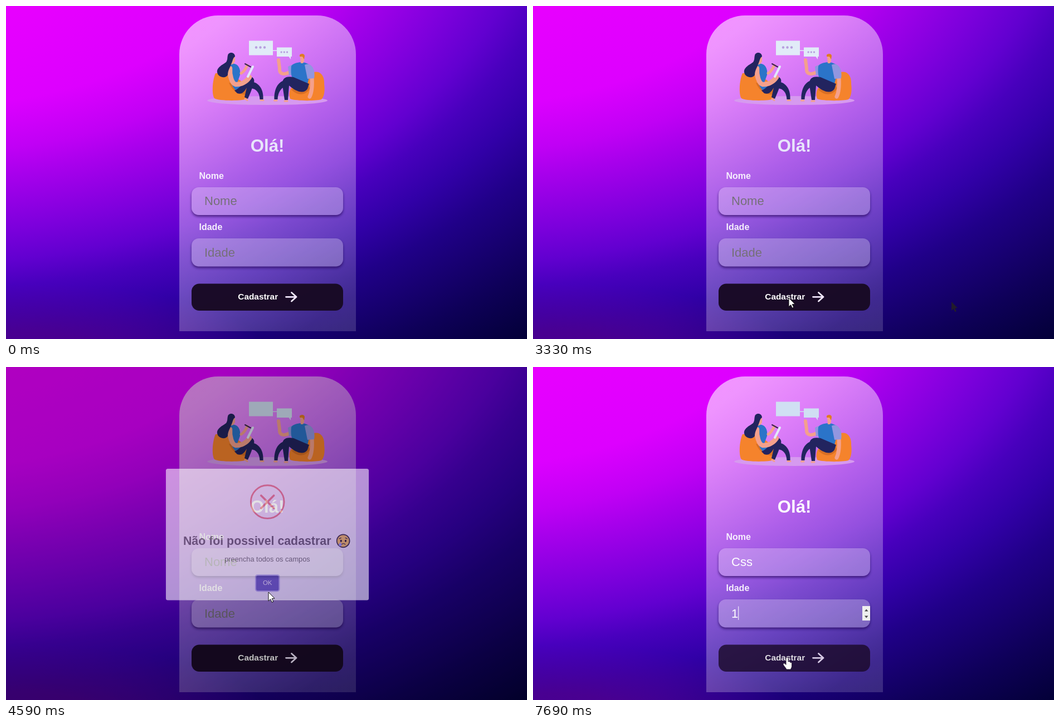
These frames come from a looping animation (935x599 px, 8 s). An HTML page:

```html
<!DOCTYPE html>
<html lang="pt-BR">
<head>
<meta charset="utf-8">
<title>Cadastro</title>
<style>
  html, body { margin: 0; width: 100%; height: 100%; overflow: hidden; background: #4300b8; }
  svg { display: block; width: 935px; height: 599px; font-family: Arial, "Liberation Sans", sans-serif; }
  text { white-space: pre; }
  .bold { font-weight: bold; }
  .field { font-size: 22px; }
  .line { fill: none; stroke-linecap: round; stroke-linejoin: round; }
</style>
</head>
<body>
<svg viewBox="0 0 935 599">
  <defs>
    <radialGradient id="sky" gradientUnits="userSpaceOnUse" gradientTransform="scale(935 599)" cx="-.15" cy="-.4" r="1.81">
      <stop offset=".236" stop-color="#e800ff"/>
      <stop offset=".387" stop-color="#dd00ff"/>
      <stop offset=".464" stop-color="#c000f5"/>
      <stop offset=".508" stop-color="#a800ec"/>
      <stop offset=".596" stop-color="#7c00dc"/>
      <stop offset=".647" stop-color="#6200d0"/>
      <stop offset=".69" stop-color="#4800bd"/>
      <stop offset=".746" stop-color="#3200a8"/>
      <stop offset=".807" stop-color="#200088"/>
      <stop offset=".917" stop-color="#0e0058"/>
      <stop offset="1" stop-color="#030038"/>
    </radialGradient>
    <radialGradient id="corner">
      <stop offset=".3" stop-color="#4c0090" stop-opacity=".9"/>
      <stop offset="1" stop-color="#5a00a8" stop-opacity="0"/>
    </radialGradient>
    <linearGradient id="glass" x1=".3" y1="0" x2=".7" y2="1">
      <stop offset="0" stop-color="#fff" stop-opacity=".58"/>
      <stop offset=".45" stop-color="#fff" stop-opacity=".37"/>
      <stop offset="1" stop-color="#fff" stop-opacity=".16"/>
    </linearGradient>
    <filter id="soft" x="-10%" y="-30%" width="120%" height="160%">
      <feGaussianBlur stdDeviation="2"/>
    </filter>
    <mask id="outside">
      <path fill="#fff" d="M311 310h317v180h-317z"/>
      <rect x="333" y="326" width="272" height="50" rx="13"/>
      <rect x="333" y="418" width="272" height="50.5" rx="13"/>
    </mask>
    <path id="arrow" d="M0 0V16L3.7 12.6 6.2 18.2 8.8 17.1 6.3 11.6 11 11.2Z"/>
  </defs>

  <rect width="935" height="599" fill="url(#sky)"/>
  <ellipse cx="40" cy="625" rx="430" ry="125" fill="url(#corner)"/>
  <path d="M311 585V87A70 70 0 0 1 381 17H558A70 70 0 0 1 628 87V585Z" fill="url(#glass)"/>

  <g id="people">
    <ellipse cx="469" cy="170" rx="108" ry="8" fill="#d69aef"/>
    <path id="bubbles" d="M436 62.500H479V79.500H486V74.500H513V91H511V96L507.500 91H486V81H479V88.500H436Z"/>
    <g id="dots" fill="#b79fdf"></g>

    <path fill="#f5832c" d="M376 121C370 134 369 160 374 166 381 171 425 171 432 167 437 160 434 150 428 140L400 118Z"/>
    <path fill="#d96f24" d="M400 138C406 152 414 158 431 160L434 150 410 140Z"/>
    <path fill="#2b74c9" d="M403 104C414 101 422 110 420 124L415 138 428 147 420 157C411 154 403 140 401 128Z"/>
    <g fill="#22245f">
      <path d="M438 137C452 135 463 149 461.500 168H455.500C455 157 450 148 438 148Z"/>
      <path d="M410 152C420 149 428 134 434 129 441 125 447 130 445 138 442 148 438 158 434 167L428 164C430 156 431 151 432 147 428 154 423 160 415 157Z"/>
    </g>
    <g class="line" stroke="#f4a08c">
      <path d="M402 112C401 124 405 139 412 141 422 142 432 136 437 128" stroke-width="8.500"/>
      <path d="M422 121C428 118 430 112 433 107" stroke-width="5"/>
      <path d="M429 167 433 169.500M457 169.500H462" stroke-width="3"/>
    </g>
    <path fill="#f4a08c" d="M404 92H411V100L408 104 403 106Z"/>
    <path fill="#22245f" d="M398 89C399 82 411 82 411 91 407 93 407 99 404 105 402 111 398 116 398 124 395 131 380 129 379 119 378 110 390 105 395 101 398 97 397 92 398 89Z"/>
    <path class="line" d="M434 127 443 109" stroke="#e1e8f8" stroke-width="4"/>
    <path class="line" d="M429 104 439 109.500" stroke="#3a2350" stroke-width="2"/>

    <path fill="#f5832c" d="M550 120C562 115 572 124 571 140 573 155 570 165 566 168 556 171 520 171 510 167 506 156 510 146 520 140Z"/>
    <path fill="#d96f24" d="M512 150C522 162 538 162 546 148L540 140Z"/>
    <g class="line" stroke="#f4a08c">
      <path d="M509 119C498 125 490 122 491 112L489 97" stroke-width="6"/>
      <path d="M549 129C550 145 549 155 545 163" stroke-width="7"/>
      <path d="M481.500 170H486M500 171H505" stroke-width="3"/>
    </g>
    <path fill="#9296e0" d="M506 109 515 105 515 124 508 125Z"/>
    <path fill="#2b74c9" d="M512 108C518 99 545 98 548 112L541 140 519 140C511 130 511 118 512 108Z"/>
    <g fill="#22245f">
      <path d="M500 134C488 136 481 150 481.500 168H487.500C488 157 492 149 500 145Z"/>
      <path d="M516 128C501 125 495 131 496 142L500 169H506L508 143C519 153 534 160 541 149L544 140Z"/>
    </g>
    <path fill="#9296e0" d="M536 106C546 100 556 112 553 130L541 131Z"/>
    <path fill="#f4a08c" d="M528 91H535V99L533 103H529Z"/>
    <path fill="#df7c22" d="M527 88C529 85 536 85 536 90L535 96 532 91 527 91Z"/>
  </g>

  <text id="hello" class="bold" x="469.100" y="262" font-size="31.300" text-anchor="middle">Olá!</text>
  <g class="bold" font-size="16" fill="#f6effd">
    <text x="346.500" y="311">Nome</text>
    <text x="346.500" y="402.500">Idade</text>
  </g>

  <g mask="url(#outside)"><g filter="url(#soft)" fill="#200050" fill-opacity=".6">
    <rect x="333" y="329" width="272" height="50" rx="13"/>
    <rect x="333" y="421" width="272" height="50.500" rx="13"/>
  </g></g>
  <g fill="#fff" fill-opacity=".26">
    <rect x="333" y="326" width="272" height="50" rx="13"/>
    <rect x="333" y="418" width="272" height="50.500" rx="13"/>
  </g>
  <text id="name" class="field" x="356" y="358"></text>
  <text id="age" class="field" x="356" y="450.500"></text>
  <path id="caret" stroke="#fff" stroke-width="1"/>
  <g id="spin">
    <path fill="#efefef" d="M591 430h14v26h-14z"/>
    <path fill="#484848" d="M595 439.500h6.500l-3.250-4zM595 447.500h6.500l-3.250 4z"/>
  </g>

  <rect id="button" x="333" y="499.500" width="272" height="48.500" rx="14"/>
  <g id="send">
    <text class="bold" x="416.300" y="528.300" font-size="15.400" fill="#fff">Cadastrar</text>
    <path class="line" d="M502.500 523.300H521M512.500 515.500 521 523.300 512.500 531" stroke="#f3e8ff" stroke-width="2.800"/>
  </g>

  <use id="ghost" href="#arrow" x="751" y="532" fill="#231d2b"/>
  <rect id="dim" width="935" height="599"/>

  <g id="modal">
    <rect x="237" y="150.500" width="464" height="301.500" rx="4.500" fill="#fff"/>
    <g id="icon" class="line" stroke="#f27474">
      <circle r="38" stroke-width="3.600"/>
      <path id="cross" d="M-14.500-14.500 14.500 14.500M14.500-14.500-14.500 14.500" stroke-width="4.600"/>
    </g>
    <g fill="#545454">
      <text class="bold" x="276.500" y="325" font-size="27.200">Não foi possivel cadastrar</text>
      <text x="469" y="363" font-size="16.300" text-anchor="middle">preencha todos os campos</text>
    </g>
    <g transform="translate(642.500 316)">
      <circle r="14.600" fill="#ffcb45" stroke="#1b1b1b" stroke-width="2.200"/>
      <g class="line" stroke="#1b1b1b" stroke-width="1.600">
        <path d="M-9-5-5-7M9-5 5-7M-3.500 8C-2 5.500 3 5.500 4.500 8"/>
      </g>
      <ellipse cx="-5" rx="2" ry="2.700"/>
      <ellipse cx="5.500" rx="2" ry="2.700"/>
      <path fill="#9aa3f2" d="M-6.500 3C-10 7-11 9-9.500 11-7.500 13-3.500 12-3.500 9-4 7-5 5-6.500 3Z"/>
    </g>
    <rect x="442.300" y="394" width="54" height="37" rx="4.500" fill="none" stroke="#b7b2ef" stroke-width="2.700"/>
    <rect id="ok" x="443.500" y="395.300" width="51.600" height="34.500" rx="3.600"/>
    <text x="469.300" y="417" font-size="14.600" text-anchor="middle" fill="#fff">OK</text>
  </g>

  <g id="pointer">
    <use id="pa" href="#arrow" fill="#fff" stroke="#111" stroke-width="1"/>
    <path id="pi" class="line" d="M-3-7H-1L0-6 1-7H3M0-6V6M-3 7H-1L0 6 1 7H3" stroke="#45364f" stroke-width="1"/>
    <path id="ph" d="M-2 1C-2-1 2-1 2 1V7C4 6 5.500 7 5.500 8.500 7.500 8 8.500 9 8.500 10.500V15C8.500 18 7 18.500 6.500 21H-1C-3 17-7 13.500-7 11.500-7 9.500-4 9.500-2 12.500Z" fill="#fff" stroke="#1b1024" stroke-width=".8"/>
  </g>
</svg>
<script>
const LOOP = 8000, CLEAR = 3060, OPEN = 3380, CLOSE = 4547;
const el = id => document.getElementById(id);
const set = (id, attrs) => { for (const k in attrs) el(id).setAttribute(k, attrs[k]); };
const show = (id, on) => set(id, { visibility: on ? 'visible' : 'hidden' });
const clamp = v => Math.max(0, Math.min(1, v));
const mix = (a, b, p) => a + (b - a) * p;
const within = (t, spans) => spans.some(([a, b]) => t >= a && t < b);

// CSS "ease": cubic-bezier(.25, .1, .25, 1)
function ease(x) {
  if (x <= 0 || x >= 1) return clamp(x);
  const curve = (s, a, b) => 3 * s * (1 - s) ** 2 * a + 3 * s * s * (1 - s) * b + s ** 3;
  let lo = 0, hi = 1;
  for (let i = 0; i < 20; i++) {
    const mid = (lo + hi) / 2;
    if (curve(mid, .25, .25) < x) lo = mid; else hi = mid;
  }
  return curve(lo, .1, 1);
}

// Eased value along [position, value] keys
function keyed(p, keys) {
  let i = 0;
  while (i < keys.length - 2 && p >= keys[i + 1][0]) i++;
  const [a, va] = keys[i], [b, vb] = keys[i + 1];
  return mix(va, vb, ease((p - a) / (b - a)));
}

const bursts = [
  [70, 460, 7], [600, 790, 3], [2510, 2910, 6], [3060, 3840, 12],
  [3920, 4180, 5], [4450, 5130, 11], [6660, 6950, 5], [7220, 7690, 7]
];
function snap(t) {
  const burst = bursts.find(([a, b]) => t >= a && t < b);
  if (!burst) return t;
  const [a, b, n] = burst, step = (b - a) / (n - 1);
  return a + Math.floor((t - a + 5) / step) * step;
}

// time, x, y, shape from here on (a arrow, i text beam, h hand)
const path = [
  [70, 751, 532, 'a'], [330, 480, 358, 'i'], [460, 461.5, 343, 'i'],
  [600, 461.5, 343, 'i'], [700, 467, 338, 'i'], [790, 461.5, 343, 'i'],
  [2510, 461.5, 343, 'i'], [2640, 463, 385, 'a'], [2760, 461, 505, 'h'],
  [2840, 460, 538, 'h'], [2910, 459, 527, 'h'], [CLEAR, 459, 525, 'a'],
  [3400, 459, 525, 'a'], [3620, 446, 318, 'i'], [3920, 446, 318, 'i'],
  [3980, 450, 335, 'a'], [4180, 471, 405, 'a'], [4590, 471, 405, 'a'],
  [4650, 443, 391, 'a'], [4790, 437, 372, 'i'],
  [5000, 431, 352, 'i'], [6700, 431, 352, 'i'], [6800, 430, 385, 'a'],
  [6850, 426, 420, 'i'], [6950, 425, 443, 'i'], [7400, 425, 443, 'i'],
  [7510, 432, 480, 'a'], [7600, 448, 512, 'h'], [7690, 456, 523, 'h'], [LOOP, 456, 523, 'h']
];
const typed = [[0, ''], [1850, 'C'], [2310, 'Cs'], [CLEAR, ''], [5860, 'C'], [6390, 'Cs'], [6660, 'Css']];
const nameCaret = [[600, 1120], [1650, 2840], [5000, 5530], [5860, 7190]];

function movePointer(t) {
  show('pointer', t >= path[0][0]);
  let i = 0;
  while (i < path.length - 2 && t >= path[i + 1][0]) i++;
  const [t0, x0, y0, kind] = path[i], [t1, x1, y1] = path[i + 1];
  const p = clamp((t - t0) / (t1 - t0));
  set('pointer', { transform: `translate(${mix(x0, x1, p)} ${mix(y0, y1, p)})` });
  for (const k of 'aih') set('p' + k, { display: k === kind ? 'inline' : 'none' });
}

function fill(id, value, hint) {
  const node = el(id);
  node.textContent = value || hint;
  node.setAttribute('fill', value ? '#fff' : '#757078');
  return 356.5 + (value ? node.getComputedTextLength() : 0);
}

function drawForm(t) {
  const name = typed.filter(([at]) => t >= at).pop()[1];
  const nameEnd = fill('name', name, 'Nome');
  const ageEnd = fill('age', t >= 7350 ? '1' : '', 'Idade');
  const onAge = t >= 7220, fresh = t < OPEN;
  show('caret', onAge || within(t, nameCaret));
  set('caret', { d: onAge ? `M${ageEnd} 430.500V455` : `M${nameEnd} 338.500V363` });
  show('spin', t >= 6870);
  const hover = within(t, [[2700, CLEAR], [7600, LOOP]]);
  set('button', { fill: hover ? '#1c0a2a' : '#190b25', 'fill-opacity': hover ? .82 : .98 });
  set('send', { opacity: hover ? .86 : 1 });
  set('hello', { fill: fresh ? '#e8e5fb' : '#fcf7ff' });
  set('bubbles', { fill: fresh ? '#e1ebf8' : '#d0dff3' });
  show('dots', fresh);
  show('ghost', t >= 130 && fresh);
}

function drawModal(t) {
  const since = t - OPEN, out = ease((t - CLOSE) / 150);
  const open = since >= 0 && out < 1;
  show('modal', open);
  set('dim', { opacity: .4 * clamp(since / 100) * clamp(1 - (t - CLOSE) / 100) });
  if (!open) return;
  const grow = keyed(clamp(since / 300), [[0, .7], [.45, 1.05], [.8, .95], [1, 1]]);
  const size = grow * mix(1, .5, out);
  set('modal', { transform: `translate(469 301.250) scale(${size}) translate(-469 -301.250)`, opacity: 1 - out });
  const p = clamp(since / 500), turn = ease(p);
  const flip = Math.cos(mix(100, 0, turn) * Math.PI / 180);
  set('icon', { transform: `translate(469.300 226.500) scale(1 ${flip})`, opacity: turn });
  const drop = keyed(p, [[0, 26], [.5, 26], [.8, -6], [1, 0]]);
  const zoom = keyed(p, [[0, .4], [.5, .4], [.8, 1.15], [1, 1]]);
  set('cross', { transform: `translate(0 ${drop}) scale(${zoom})`, opacity: keyed(p, [[0, 0], [.5, 0], [1, 1]]) });
  set('ok', { fill: t < 4150 ? '#7066e8' : '#5b53bd' });
}

function draw(t) {
  drawForm(t);
  drawModal(t);
  movePointer(t);
}

const dot = (x, y, r) => `<circle cx="${x}" cy="${y}" r="${r}"/>`;
el('dots').innerHTML = [-1, 0, 1].map(i => dot(456.5 + 7.5 * i, 74.5, 2.2) + dot(499.3 + 5.2 * i, 83, 1.7)).join('');

const start = performance.now();
function tick() {
  draw(snap((performance.now() - start) % LOOP));
  requestAnimationFrame(tick);
}
tick();
</script>
</body>
</html>
```
